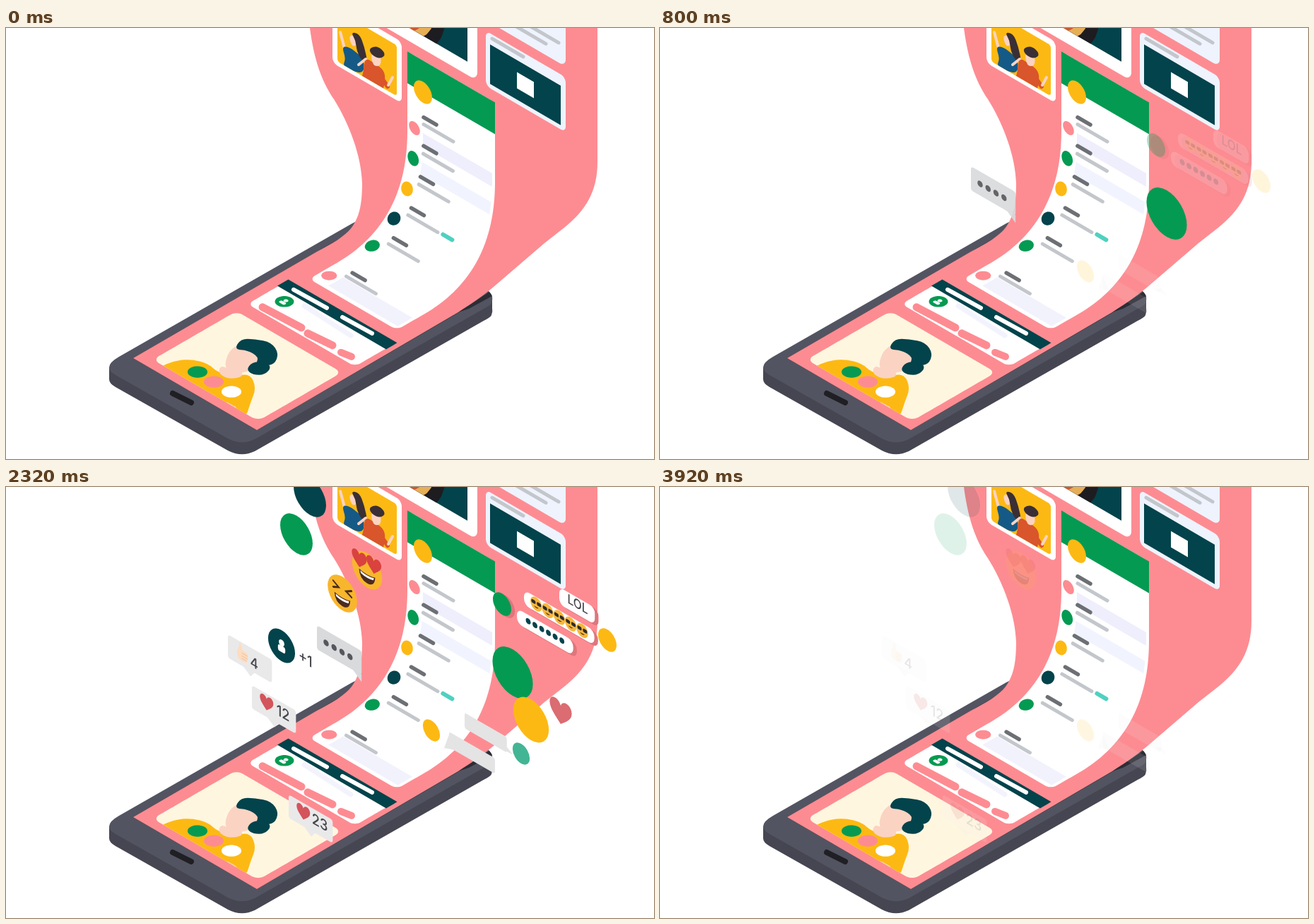
Recreate the animation shown at these times as an HTML page with a canvas. Size 917 by 611 pixels, loop 4000 ms.

```html
<!DOCTYPE html>
<html lang="en">
<head>
<meta charset="utf-8">
<title>Endless feed</title>
<style>
html, body { margin: 0; width: 100%; height: 100%; overflow: hidden; background: #fff; }
canvas { display: block; width: 917px; height: 611px; }
</style>
</head>
<body>
<canvas id="stage"></canvas>
<script>
const W = 917, H = 611, LOOP = 4000, STEP = 80;
const PINK = '#fd8c92', DARK = '#03434b', GREEN = '#049a52', YELLOW = '#fdb913';
const CREAM = '#fff6e0', SKIN = '#fbd3c3', GREY = '#c3c7cc', INK = '#6c6f74', PALE = '#eef3fd';
const canvas = document.getElementById('stage');
const ctx = canvas.getContext('2d');
const dpr = window.devicePixelRatio || 1;
canvas.width = W * dpr;
canvas.height = H * dpr;

const clamp = v => Math.max(0, Math.min(1, v));
const easeInOut = t => t < 0.5 ? 2 * t * t : 1 - 2 * (1 - t) ** 2;

// Feed coordinates: u runs across (screen x units), q runs along the ribbon.
const SLOPE = 0.583, BEND = 203, PERIOD = 918, SCROLL_MS = 800;
const bend = [[0, 0, -185]];
for (let i = 1; i <= 60; i++) {
  const t = i / 60, [len, px, py] = bend[i - 1];
  const x = -100 * t * t;
  const y = -185 * (1 - t) ** 2 - 112 * t * (1 - t) + 2 * t * t;
  bend.push([len + Math.hypot(x - px, y - py), x, y]);
}

function profile(q) {
  if (q <= 0) return [0, q - 185];
  if (q >= BEND) {
    const d = (q - BEND) * 0.865;
    return [-100 - d, 2 + d * 0.58];
  }
  const s = q / BEND * bend[60][0];
  let i = 1;
  while (bend[i][0] < s) i++;
  const a = bend[i - 1], b = bend[i], k = (s - a[0]) / (b[0] - a[0]);
  return [a[1] + (b[1] - a[1]) * k, a[2] + (b[2] - a[2]) * k];
}

let shift = 0;
function place([u, q]) {
  const [x, y] = profile(q + shift);
  return [u + x, SLOPE * u + y];
}

// Resting screen position to feed coordinates, on the wall or on the phone.
const wall = (x, y) => [x, y - SLOPE * x + 185];
function flat(x, y) {
  const u = (x + (y + 56.2) / 0.5815) / 2;
  return [u, BEND + (u - x - 100) * 1.156];
}
const points = (at, list) => {
  const out = [];
  for (let i = 0; i < list.length; i += 2) out.push(at(list[i], list[i + 1]));
  return out;
};

function trace(pts) {
  const path = new Path2D();
  pts.forEach((a, i) => {
    const b = pts[(i + 1) % pts.length];
    const n = Math.max(1, Math.ceil(Math.abs(b[1] - a[1]) / 6));
    for (let j = 0; j < n; j++) {
      path.lineTo(...place([a[0] + (b[0] - a[0]) * j / n, a[1] + (b[1] - a[1]) * j / n]));
    }
  });
  path.closePath();
  return path;
}
function fill(color, path) {
  ctx.fillStyle = color;
  ctx.fill(path);
}
function clipped(path, draw) {
  ctx.save();
  ctx.clip(path);
  draw();
  ctx.restore();
}
function box(u0, q0, u1, q1, r = 0) {
  if (!r) return trace([[u0, q0], [u1, q0], [u1, q1], [u0, q1]]);
  const ru = r * 0.866, pts = [];
  const corners = [[u1 - ru, q0 + r], [u1 - ru, q1 - r], [u0 + ru, q1 - r], [u0 + ru, q0 + r]];
  corners.forEach(([u, q], c) => {
    for (let i = 0; i <= 6; i++) {
      const a = (c - 1 + i / 6) * Math.PI / 2;
      pts.push([u + ru * Math.cos(a), q + r * Math.sin(a)]);
    }
  });
  return trace(pts);
}
function disc(u, q, r) {
  const pts = [];
  for (let i = 0; i < 28; i++) {
    const a = i / 28 * 2 * Math.PI;
    pts.push([u + r * 0.866 * Math.cos(a), q + r * Math.sin(a)]);
  }
  return trace(pts);
}
function blob(at, list) {
  const p = points(at, list).map(place), path = new Path2D(), n = p.length;
  const mid = i => [(p[i][0] + p[(i + 1) % n][0]) / 2, (p[i][1] + p[(i + 1) % n][1]) / 2];
  path.moveTo(...mid(n - 1));
  for (let i = 0; i < n; i++) path.quadraticCurveTo(...p[i], ...mid(i));
  return path;
}
function line(a, b, width, color) {
  ctx.beginPath();
  ctx.moveTo(...place(a));
  ctx.lineTo(...place(b));
  ctx.lineWidth = width;
  ctx.lineCap = 'round';
  ctx.strokeStyle = color;
  ctx.stroke();
}
const row = (u0, u1, q, width, color) => line([u0 + 2, q], [u1 - 2, q], width, color);
const stick = (at, x0, y0, x1, y1, w, c) => line(at(x0, y0), at(x1, y1), w, c);

function person(u, q, r) {
  fill(GREEN, disc(u, q, r));
  fill('#fff', disc(u, q - r * 0.22, r * 0.26));
  fill('#fff', box(u - r * 0.36, q + r * 0.06, u + r * 0.36, q + r * 0.5, r * 0.2));
}

function lady() {
  fill(YELLOW, blob(flat, [205, 486, 238, 471, 262, 469, 286, 475, 300, 488, 325, 492,
    346, 490, 354, 510, 346, 530, 338, 556, 280, 524]));
  fill(SKIN, blob(flat, [300, 488, 304, 478, 314, 482, 330, 478, 336, 492, 326, 496, 312, 496]));
  fill(SKIN, blob(flat, [309, 478, 315, 458, 328, 448, 348, 450, 362, 468, 350, 484, 330, 489, 316, 486]));
  fill(DARK, blob(flat, [323, 455, 332, 440, 352, 440, 376, 445, 386, 461, 380, 476,
    366, 478, 353, 476, 358, 466, 342, 456]));
  fill(DARK, blob(flat, [340, 484, 348, 473, 366, 472, 376, 480, 366, 491, 350, 491]));
  stick(flat, 313, 532, 324, 538, 4, SKIN);
  [[271, 487, GREEN], [294, 501, PINK], [319, 515, '#fff']]
    .forEach(([x, y, c]) => fill(c, disc(...flat(x, y), 11.5)));
}
function ladyCard() {
  const card = box(556, 353, 705, 490, 10);
  fill(CREAM, card);
  clipped(card, lady);
}

function profileCard() {
  fill('#fff', box(555, 270, 707, 334, 9));
  fill(DARK, box(554, 266, 708, 284));
  stick(flat, 407, 370, 454, 396, 6, '#fff');
  stick(flat, 476, 409, 518, 432, 6, '#fff');
  stick(flat, 422, 393, 488, 435, 7, '#f3f3fd');
  person(...flat(394, 387), 11);
  stick(flat, 363, 395, 418, 424, 11, PINK);
  stick(flat, 427, 432, 462, 449, 11, PINK);
  stick(flat, 474, 459, 489, 465, 10, PINK);
}

function listCard() {
  fill('#fff', box(568, -113, 692, 248, 9));
  fill(GREEN, box(568, -113, 692, -68));
  [[-10, 8], [28, 44], [218, 242]].forEach(([a, b], i) => {
    fill(['#efeefc', '#f1f4fe', '#f2f2fd'][i], box(590, a, 688, b));
  });
  fill(YELLOW, disc(590, -68, 15));
  const dots = [PINK, GREEN, YELLOW, DARK, GREEN, PINK];
  [-10, 30, 70, 112, 157, 227].forEach((q, i) => {
    fill(dots[i], disc(578, q, 9));
    row(589, 611, q - 23, 5.5, INK);
    row(589, 635, q - 13, 5, GREY);
  });
  row(638, 655, 98, 6, '#4fd1c0');
}

function dancers() {
  stick(wall, 473, 6, 480, 32, 4, SKIN);
  fill('#155a86', blob(wall, [475, 26, 486, 27, 500, 38, 507, 46, 506, 64, 492, 62, 476, 54, 481, 44]));
  fill(SKIN, blob(wall, [485, 10, 495, 11, 497, 25, 489, 26]));
  fill('#3a2f35', blob(wall, [488, 6, 500, 8, 507, 26, 512, 50, 503, 46, 496, 32, 495, 18]));
  stick(wall, 499, 52, 509, 44, 4, SKIN);
  stick(wall, 531, 70, 540, 83, 6, '#d9552b');
  stick(wall, 541, 81, 547, 70, 4, SKIN);
  fill('#d9552b', blob(wall, [508, 42, 522, 50, 535, 60, 537, 74, 530, 102, 500, 82, 506, 62]));
  fill(SKIN, blob(wall, [516, 34, 530, 37, 531, 54, 519, 54]));
  fill('#3a2f35', blob(wall, [513, 29, 526, 25, 538, 37, 530, 44, 518, 39]));
}
function photoCard() {
  const picture = box(469, -113, 553, -41, 4);
  fill('#fff', box(462, -122, 560, -35, 8));
  fill(YELLOW, picture);
  clipped(picture, dancers);
}

function pizza() {
  fill('#1d1c20', disc(560, -190, 71));
  fill('#e6ae56', disc(554, -191, 61));
  fill('#cf5630', disc(551, -191, 53));
  let seed = 7;
  const rnd = () => (seed = seed * 16807 % 2147483647) / 2147483647;
  const spot = r => {
    const a = rnd() * 6.28;
    return [551 + Math.cos(a) * r * 0.866, -191 + Math.sin(a) * r];
  };
  const tones = ['#f6d08a', '#e9793f', '#fff1d8', '#f0b24c', '#2c7a46', '#b93a24'];
  for (let i = 0; i < 84; i++) {
    fill(tones[i % 6], disc(...spot(Math.sqrt(rnd()) * 52), 2 + rnd() * 3));
  }
  for (let i = 0; i < 6; i++) {
    const [u, q] = spot(12 + i * 6);
    fill('#fff6ea', box(u - 5, q - 6, u + 5, q + 6, 2));
  }
  for (let i = 0; i < 9; i++) {
    const a = i * 2.4, r = 16 + i * 3.6;
    const u = 551 + Math.cos(a) * r * 0.866, q = -191 + Math.sin(a) * r;
    fill('#fff3e2', disc(u, q, 9));
    fill(i % 2 ? '#d8573a' : '#f0b978', disc(u + 1, q, 5));
    fill('#fff3e2', disc(u + 2, q + 1, 2));
  }
  line([617, -202], [637, -208], 5, '#1d1c20');
}

function postCards() {
  fill('#fff', box(464, -332, 667, -276, 8));
  fill(DARK, box(464, -340, 667, -320));
  row(475, 518, -330, 5, '#fff');
  row(534, 591, -330, 5, '#fff');
  row(499, 566, -311, 7, '#f3f3fd');
  person(485, -308, 10);
  [[479, 520], [535, 576], [592, 603]].forEach(([a, b]) => row(a, b, -286, 12, PINK));

  fill('#fff', box(464, -266, 667, -129, 12));
  person(482, -243, 10);
  row(500, 560, -248, 6, '#f1f2fc');
  row(500, 540, -235, 6, '#f1f2fc');
  const picture = box(464, -221, 653, -148);
  fill(DARK, picture);
  clipped(picture, pizza);
  const [x, y] = place([654, -221]);
  tilted(x, y, () => heartEyes(15));
}

function sideCards() {
  fill(PALE, box(679, -335, 792, -222, 10));
  row(686, 725, -327, 5, GREY);
  [-306, -274, -242].forEach((q, i) => {
    row(716, 784, q - 8, 5, GREY);
    row(716, 766, q + 4, 5, GREY);
    if (i) return person(697, q, 15);
    fill(GREEN, disc(697, q, 15));
    row(691, 703, q, 2, '#fff');
    line([697, q - 4], [697, q + 4], 2, '#fff');
  });
  fill(PALE, box(679, -207, 792, -129, 8));
  row(686, 734, -201, 5, GREY);
  fill(DARK, box(685, -191, 785, -135));
  fill('#fff', box(723, -174, 747, -151));
}

function tilted(x, y, draw) {
  ctx.save();
  ctx.transform(0.866, 0.5, 0, 1, x, y);
  draw();
  ctx.restore();
}
function dot(x, y, r, color) {
  ctx.beginPath();
  ctx.arc(x, y, r, 0, 7);
  ctx.fillStyle = color;
  ctx.fill();
}
function panel(x, y, w, h, r, color) {
  ctx.beginPath();
  ctx.roundRect(x, y, w, h, r);
  ctx.fillStyle = color;
  ctx.fill();
}
const svg = (d, color) => fill(color, new Path2D(d));
function heart(x, y, s, color) {
  ctx.save();
  ctx.translate(x, y);
  ctx.scale(s, s);
  svg('M0 .95C-.5 .5-1 .15-1-.35C-1-1-.2-1.1 0-.5C.2-1.1 1-1 1-.35C1 .15 .5 .5 0 .95Z', color);
  ctx.restore();
}
function label(text, x, y, size) {
  ctx.font = `500 ${size}px Inter, "Open Sans", sans-serif`;
  ctx.textAlign = 'center';
  ctx.textBaseline = 'middle';
  ctx.fillStyle = '#45464b';
  ctx.fillText(text, x, y);
}
function mouth(r) {
  ctx.save();
  ctx.scale(r / 24, r / 24);
  svg('M-13 4Q0 8 13 4Q12 18 0 18Q-12 18-13 4Z', '#4b2b20');
  svg('M-11 5.500Q0 9 11 5.500L10 9Q0 12-10 9Z', '#fff');
  ctx.restore();
}
function heartEyes(r) {
  dot(0, 0, r, '#f8b62c');
  heart(-r * 0.52, -r * 0.4, r * 0.5, '#d9423f');
  heart(r * 0.45, -r * 0.5, r * 0.5, '#d9423f');
  mouth(r);
}
function laugh() {
  dot(0, 0, 24, '#f8b62c');
  mouth(24);
  ctx.lineWidth = 2.6;
  ctx.strokeStyle = '#4b2b20';
  ctx.stroke(new Path2D('M-15-11L-6-6L-15-2M15-11L6-6L15-2'));
}
function shades(x, y) {
  dot(x, y, 9.5, '#f6b73c');
  panel(x - 8, y - 4, 7, 5, 2, '#2b2b30');
  panel(x + 1, y - 4, 7, 5, 2, '#2b2b30');
  svg(`M${x - 4} ${y + 4}q4 3 8 0z`, '#4b2b20');
}
function bubble() {
  panel(0, 0, 72, 33, 4, '#e9e9ea');
  svg('M24 32L37 41L44 32Z', '#e9e9ea');
}
function hearts(count) {
  bubble();
  heart(24, 13, 11, '#d4545b');
  label(count, 51, 15, 21);
}
function thumb() {
  bubble();
  svg('M19 2Q23 2 23 10L30 11Q34 13 32 18Q33 23 29 26L20 26Q15 25 15 18Q15 12 18 9Z', '#fddcc0');
  ctx.lineWidth = 1;
  ctx.strokeStyle = '#eebf9b';
  ctx.stroke(new Path2D('M23 15h9M23 19h9M23 22.500h7'));
  label('4', 43, 20, 20);
}
function friend() {
  dot(0, 0, 22, DARK);
  dot(0, -4, 4.5, '#fff');
  panel(-6, 0, 12, 9, 3, '#fff');
  label('+1', 39, 0, 21);
}
function typing() {
  panel(0, 0, 73, 34, 4, '#d9dadc');
  svg('M58 33H73V44Z', '#d9dadc');
  [15, 28, 41, 54].forEach(x => dot(x, 17.5, 4.3, '#56575c'));
}
function pill(w, h, r) {
  panel(6, 1, w, h, r, '#df767d');
  panel(0, 0, w, h, r, '#fff');
}
function shadesPill() {
  pill(115, 21, 9);
  for (let i = 0; i < 5; i++) shades(20 + i * 18.8, 10);
}
function dotsPill() {
  pill(92, 21, 9);
  for (let i = 0; i < 6; i++) dot(18.5 + i * 11, 9, 4, DARK);
}
function lol() {
  pill(58, 24, 8);
  label('LOL', 30, 10, 18);
}
function shadowDot() {
  dot(6, 0, 15, '#df767d');
  dot(0, 0, 15, GREEN);
}
function noteA() {
  panel(0, 0, 69, 22, 3, '#e4e4e5');
  svg('M58 21L69 14L79 20Z', '#e4e4e5');
}
function noteB() {
  panel(0, 0, 75, 22, 3, '#e4e4e5');
  svg('M0 4L-8 27L10 21Z', '#e4e4e5');
}
const ball = (r, color) => () => dot(0, 0, r, color);

// x, y, fade-in start, drawing, lingers while fading out
const floaters = [
  [430, 13, 1190, ball(26.5, DARK), 1],
  [411, 67, 1370, ball(26.5, GREEN), 1],
  [511, 118, 1130, () => heartEyes(24.5), 1],
  [476, 151, 1025, laugh],
  [440, 196, 530, typing],
  [314, 209, 1760, thumb, 1],
  [390, 225, 1490, friend],
  [348, 281, 1820, () => hearts('12'), 1],
  [400, 436, 1890, () => hearts('23'), 1],
  [702, 166, 710, shadowDot],
  [733, 146, 755, shadesPill],
  [723, 172, 755, dotsPill],
  [783, 142, 755, lol],
  [851, 217, 755, ball(15, YELLOW)],
  [717, 263, 405, ball(33, GREEN)],
  [743, 330, 1690, ball(29, YELLOW)],
  [785, 319, 2030, () => heart(0, 0, 18, '#d9686e')],
  [729, 378, 1000, ball(14, '#43b594')],
  [602, 345, 755, ball(14, YELLOW), 1],
  [649, 320, 770, noteA, 1],
  [627, 347, 770, noteB, 1]
];

const body = new Path2D('M146 481Q146 474 160 466L490 277L520 262L683 373Q691 380 687 390' +
  'Q686 393 676 398L352 583Q333 592 314 582L155 492Q146 487 146 481Z');
const screen = new Path2D('M180 468L490 288L655 395L355 570Z');
const ribbon = new Path2D('M430 0C436 45 446 74 464 101C486 136 503 182 504 220C504 250 500 268 489 283' +
  'C479 296 462 305 440 317L180 468L355 570L640 403C655 393 675 380 690 367L762 305L790 283' +
  'C820 259 837 232 837 190V0Z');

function phone() {
  ctx.save();
  ctx.translate(0, 17);
  fill('#454651', body);
  ctx.restore();
  fill('#454651', new Path2D('M146 481V498L334 604L688 400V385L334 560Z'));
  fill('#535461', body);
  fill('#2c2d35', screen);
  fill('#2c2d35', new Path2D('M640 403L684 374L688 380L655 398Z'));
  ctx.beginPath();
  ctx.moveTo(236, 518);
  ctx.lineTo(262, 531);
  ctx.lineWidth = 8;
  ctx.lineCap = 'round';
  ctx.strokeStyle = '#1f1f24';
  ctx.stroke();
}

function feed(t) {
  const moved = PERIOD * easeInOut(clamp(t / SCROLL_MS));
  [-moved, PERIOD - moved].forEach(offset => {
    shift = offset;
    [ladyCard, profileCard, listCard, photoCard, postCards, sideCards].forEach(draw => draw());
  });
}

function render(t) {
  ctx.setTransform(dpr, 0, 0, dpr, 0, 0);
  ctx.fillStyle = '#fff';
  ctx.fillRect(0, 0, W, H);
  phone();
  fill(PINK, ribbon);
  clipped(ribbon, () => feed(t));
  floaters.forEach(([x, y, start, draw, late]) => {
    const out = late ? (4010 - t) / 710 : (3740 - t) / 460;
    ctx.globalAlpha = clamp((t - start) / 300) * clamp(out);
    if (ctx.globalAlpha > 0) tilted(x, y, draw);
  });
  ctx.globalAlpha = 1;
}

const begin = performance.now();
let shown = -1;
function tick() {
  const now = Math.max(0, performance.now() - begin) % LOOP;
  const t = Math.floor(now / STEP) * STEP;
  if (t !== shown) render(shown = t);
  requestAnimationFrame(tick);
}
tick();
</script>
</body>
</html>
```
